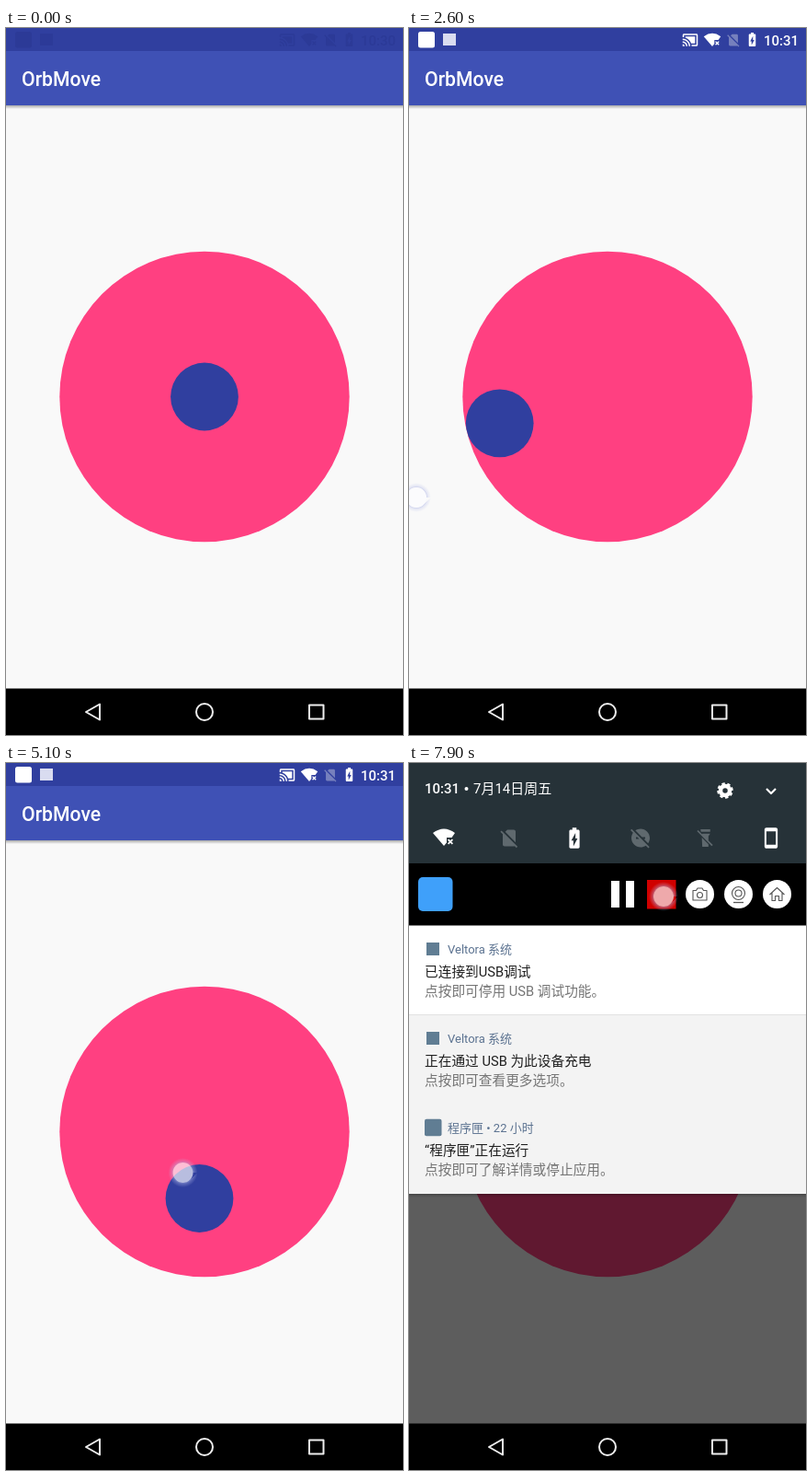
An HTML page with a canvas for the animation above (8 s loop, 432 px wide and 768 px high).

```html
<!DOCTYPE html>
<html lang="zh">
<head>
<meta charset="utf-8">
<style>
html, body { margin: 0; width: 100%; height: 100%; overflow: hidden; background: #f9f9f9; }
canvas { display: block; }
</style>
</head>
<body>
<canvas id="stage" width="432" height="768"></canvas>
<script>
const ctx = document.getElementById('stage').getContext('2d');
const LOOP = 8000, STEP = 100, LAG = 80;
const CENTER = { x: 216, y: 400.5 }, DISC = 157.7, KNOB = 36.9;
const FONT = 'Roboto, "Noto Sans CJK SC", "Noto Sans CJK", sans-serif';

const ICONS = {
  cast: 'M21 3H3c-1.1 0-2 .9-2 2v3h2V5h18v14h-7v2h7c1.1 0 2-.9 2-2V5c0-1.1-.9-2-2-2zM1 18v3h3c0-1.66-1.34-3-3-3zm0-4v2c2.76 0 5 2.24 5 5h2c0-3.87-3.13-7-7-7zm0-4v2c4.97 0 9 4.03 9 9h2c0-6.08-4.93-11-11-11zM19 7H5v1.6c4 1.3 7.1 4.4 8.4 8.4H19z',
  wifi: 'M12 21L0 7Q12-2 24 7L20.5 12H15V17.5zM16 14.7L17.2 13.5 19 15.3 20.8 13.5 22 14.7 20.2 16.5 22 18.3 20.8 19.5 19 17.7 17.2 19.5 16 18.3 17.8 16.5z',
  simOff: 'M19 5c0-1.1-.9-2-2-2h-7L7.7 5.3 19 16.7zM3.65 3.9L2.4 5.15 5 7.8V19c0 1.1.9 2 2 2h10c.35 0 .7-.1 1-.26l1.9 1.9 1.2-1.3z',
  battery: 'M15.7 4H14V2h-4v2H8.3C7.6 4 7 4.6 7 5.3v15.4C7 21.4 7.6 22 8.3 22h7.4c.7 0 1.3-.6 1.3-1.3V5.3C17 4.6 16.4 4 15.7 4zM11 20v-5.5H9L13 7v5.5h2z',
  quietOff: 'M17 11v2h-1.5l4.7 4.7C21.3 16 22 14.1 22 12c0-5.5-4.5-10-10-10-2.1 0-4 .7-5.7 1.8L13.5 11zM2.3 2.3L1 3.5l2.8 2.8C2.7 8 2 9.9 2 12c0 5.5 4.5 10 10 10 2.1 0 4-.7 5.7-1.8L20.5 23l1.2-1.3zM7 13v-2h1.5l2 2z',
  torchOff: 'M7 2H18V5H7.5zM9 7H18L16 10V15L9 8zM8.5 11.5L16 19V22H9zM3 4.3L4.3 3 21 19.7 19.7 21z',
  phone: 'M17 1H7c-1.1 0-2 .9-2 2v18c0 1.1.9 2 2 2h10c1.1 0 2-.9 2-2V3c0-1.1-.9-2-2-2zm0 18H7V5h10z'
};
for (const name in ICONS) ICONS[name] = new Path2D(ICONS[name]);

// time, x, y
const DRAG = [
  [500, 216, 400], [700, 262, 402], [900, 325, 392], [1100, 378, 335], [1300, 396, 262],
  [1500, 345, 195], [1820, 202, 161], [1900, 155, 161], [2050, 82, 190], [2200, 24, 250],
  [2400, -16, 370], [2600, 8, 510], [2800, 85, 610], [3000, 195, 646], [3170, 280, 605],
  [3320, 283, 536], [3400, 278, 510], [3800, 290, 430], [4000, 290, 430], [4250, 290, 326],
  [4420, 294, 345], [4500, 296, 357], [4750, 294, 450], [5000, 215, 480], [5200, 170, 410],
  [5370, 225, 400], [5520, 261, 478], [5600, 260, 481], [5800, 245, 470]
];
const PULL = [[6300, 230, 6], [6500, 234, 110], [6700, 240, 333], [6800, 242, 410]];
// time, header offset, notification offset, panel bottom, scrim
const SHADE = [
  [6500, -109, -176, 0, 0], [6600, -80, -130, 60, .02], [6700, -43, -70, 121, .05],
  [6800, -20, -30, 290, .35], [6900, -5, -8, 420, .55], [7000, 0, 0, 468, .625]
];

function track(keys, t) {
  const last = keys[keys.length - 1];
  if (t <= keys[0][0]) return keys[0].slice(1);
  if (t >= last[0]) return last.slice(1);
  const i = keys.findIndex(k => k[0] > t), a = keys[i - 1], b = keys[i];
  const f = (t - a[0]) / (b[0] - a[0]);
  return a.slice(1).map((v, j) => v + (b[j + 1] - v) * f);
}
const during = (keys, t) => t >= keys[0][0] && t <= keys[keys.length - 1][0];

function rect(x, y, w, h, color, radius = 0) {
  ctx.fillStyle = color;
  ctx.beginPath();
  ctx.roundRect(x, y, w, h, radius);
  ctx.fill();
}
function disc(x, y, r, color) {
  ctx.fillStyle = color;
  ctx.beginPath();
  ctx.arc(x, y, r, 0, 7);
  ctx.fill();
}
function outline(path, color, width) {
  ctx.strokeStyle = color;
  ctx.lineWidth = width;
  ctx.stroke(new Path2D(path));
}
function ring(x, y, r, color, width) {
  outline(`M${x - r} ${y}a${r} ${r} 0 1 0 ${2 * r} 0a${r} ${r} 0 1 0 ${-2 * r} 0`, color, width);
}
function text(str, x, y, size, color, weight = 400) {
  ctx.font = `${weight} ${size}px ${FONT}`;
  ctx.fillStyle = color;
  ctx.fillText(str, x, y);
}
function icon(name, x, y, size, color = '#fff') {
  ctx.save();
  ctx.translate(x - size / 2, y - size / 2);
  ctx.scale(size / 24, size / 24);
  ctx.fillStyle = color;
  ctx.fill(ICONS[name]);
  ctx.restore();
}
function shadow(y, height, alpha) {
  const g = ctx.createLinearGradient(0, y, 0, y + height);
  g.addColorStop(0, `rgba(0,0,0,${alpha})`);
  g.addColorStop(1, 'rgba(0,0,0,0)');
  ctx.fillStyle = g;
  ctx.fillRect(0, y, 432, height);
}
function shifted(dy, draw) {
  ctx.save();
  ctx.translate(0, dy);
  draw();
  ctx.restore();
}

function drawStatusBar(t) {
  rect(0, 0, 432, 25, '#303f9f');
  ctx.globalAlpha = t ? Math.min(1, t / 300) : .12;
  const color = t ? '#fff' : '#101c60';
  rect(10, 4, 18, 17.5, color, 2.5);
  rect(37, 6, 14, 13, t ? '#d9dcf0' : color);
  icon('cast', 306, 13, 18, color);
  icon('wifi', 330, 13, 18.5, color);
  icon('simOff', 353, 13, 17, t ? '#7680bd' : color);
  icon('battery', 373.5, 12.5, 18, color);
  text(t ? '10:31' : '10:30', 386, 18.5, 15, color, 500);
  ctx.globalAlpha = 1;
}

function drawApp(t) {
  rect(0, 0, 432, 768, '#f9f9f9');
  rect(0, 25, 432, 59, '#3f51b5');
  shadow(84, 4, .32);
  text('OrbMove', 17, 63, 21.2, '#fff', 500);
  drawStatusBar(t);
  disc(CENTER.x, CENTER.y, DISC, '#ff4081');
  let dx = 0, dy = 0;
  if (during(DRAG, t)) {
    const [x, y] = track(DRAG, t - LAG);
    dx = x - CENTER.x;
    dy = y - CENTER.y;
    const limit = Math.min(1, (DISC - KNOB) / (Math.hypot(dx, dy) || 1));
    dx *= limit;
    dy *= limit;
  }
  disc(CENTER.x + dx, CENTER.y + dy, KNOB, '#303f9f');
}

function drawNavigation() {
  rect(0, 717.5, 432, 51, '#000');
  ctx.lineJoin = 'round';
  outline('M87 743L102 734.5V751.5Z', '#eee', 2);
  ring(216, 743, 9, '#eee', 2);
  outline('M330 735.5H345.5V750.5H330Z', '#eee', 2);
}

function drawHeader() {
  rect(0, 0, 432, 109, '#263238');
  text('10:31', 17, 33, 15, '#fff', 500);
  disc(62.5, 28, 2, '#fff');
  text('7月14日周五', 70, 33, 15, '#fff');
  ring(344, 30, 5, '#fff', 4.5);
  ctx.setLineDash([3.3, 2.59]);
  ring(344, 30, 7.5, '#fff', 2.5);
  ctx.setLineDash([]);
  outline('M389 28L394 33L399 28', '#fff', 2.2);
  icon('wifi', 38, 81, 24);
  icon('simOff', 109, 81.5, 24, '#5f696e');
  icon('battery', 180, 81.5, 27);
  icon('quietOff', 252, 81.5, 24, '#5f696e');
  icon('torchOff', 322, 81.5, 23, '#5f696e');
  icon('phone', 394, 81.5, 24.5);
}

function drawRecorder() {
  rect(0, 60, 432, 116.5, '#000');
  rect(10, 124, 37.5, 37, '#3fa0fa', 5);
  rect(220, 128, 9, 29, '#fff');
  rect(236, 128, 9, 29, '#fff');
  rect(259, 127, 31.5, 31.5, '#d00000');
  for (const x of [316.5, 358.5, 400.5]) disc(x, 142.5, 15.5, '#fff');
  const ink = '#555';
  outline('M309 138.5H312.5L314 136H319L320.5 138.5H324V149H309Z', ink, 1.1);
  ring(316.5, 143.5, 3, ink, 1.1);
  ring(358.5, 141.5, 7, ink, 1.1);
  ring(358.5, 141.5, 3.5, ink, 1.1);
  outline('M353 151.5H364', ink, 1.3);
  outline('M392.5 143L400.5 135.5L408.5 143M395 141V149.5H398.5V144.5H402.5V149.5H406V141', ink, 1.1);
}

function drawNote(y, source, title, detail, iconSize) {
  rect(iconSize > 16 ? 17 : 19, y - 4.5 - iconSize / 2, iconSize, iconSize, '#607d93', iconSize > 16 ? 2 : 0);
  text(source, 42, y, 13, '#5b7290');
  text(title, 17, y + 25.5, 14.7, '#202020');
  text(detail, 17, y + 46.5, 14.7, '#757575');
}

function drawShade(t) {
  if (t <= SHADE[0][0]) return;
  const [headerY, listY, bottom, scrim] = track(SHADE, t);
  rect(0, 0, 432, 718, `rgba(0,0,0,${scrim})`);
  shadow(bottom, 4, .25);
  ctx.save();
  ctx.beginPath();
  ctx.rect(0, 0, 432, bottom);
  ctx.clip();
  shifted(listY, () => {
    rect(0, 176, 432, 97.5, '#fff');
    drawNote(206.5, 'Veltora 系统', '已连接到USB调试', '点按即可停用 USB 调试功能。', 14);
  });
  shifted(Math.min(listY, bottom - 284), () => {
    rect(0, 273, 432, 400, '#f3f3f3');
    rect(0, 273, 432, 1, '#e2e2e2');
    drawNote(303.5, 'Veltora 系统', '正在通过 USB 为此设备充电', '点按即可查看更多选项。', 14);
    drawNote(400.5, '程序匣 • 22 小时', '“程序匣”正在运行', '点按即可了解详情或停止应用。', 18.5);
  });
  shifted(listY, drawRecorder);
  ctx.restore();
  shifted(headerY, drawHeader);
}

function drawTouch(x, y) {
  const halo = ctx.createRadialGradient(x, y, 11, x, y, 16);
  halo.addColorStop(0, 'rgba(170,178,228,.55)');
  halo.addColorStop(.3, 'rgba(180,186,232,.3)');
  halo.addColorStop(1, 'rgba(190,195,235,0)');
  ctx.fillStyle = halo;
  ctx.beginPath();
  ctx.arc(x, y, 16, 0, 7);
  ctx.arc(x, y, 11, 0, 7, true);
  ctx.fill('evenodd');
  disc(x, y, 11, 'rgba(252,252,255,.67)');
}

function draw(t) {
  drawApp(t);
  drawShade(t);
  drawNavigation();
  for (const path of [DRAG, PULL]) if (during(path, t)) drawTouch(...track(path, t));
  if (t >= 7900) drawTouch(277, 145);
}

const start = performance.now();
function frame() {
  const t = (performance.now() - start) % LOOP;
  draw(Math.floor(t / STEP) * STEP);
  requestAnimationFrame(frame);
}
frame();
</script>
</body>
</html>
```
